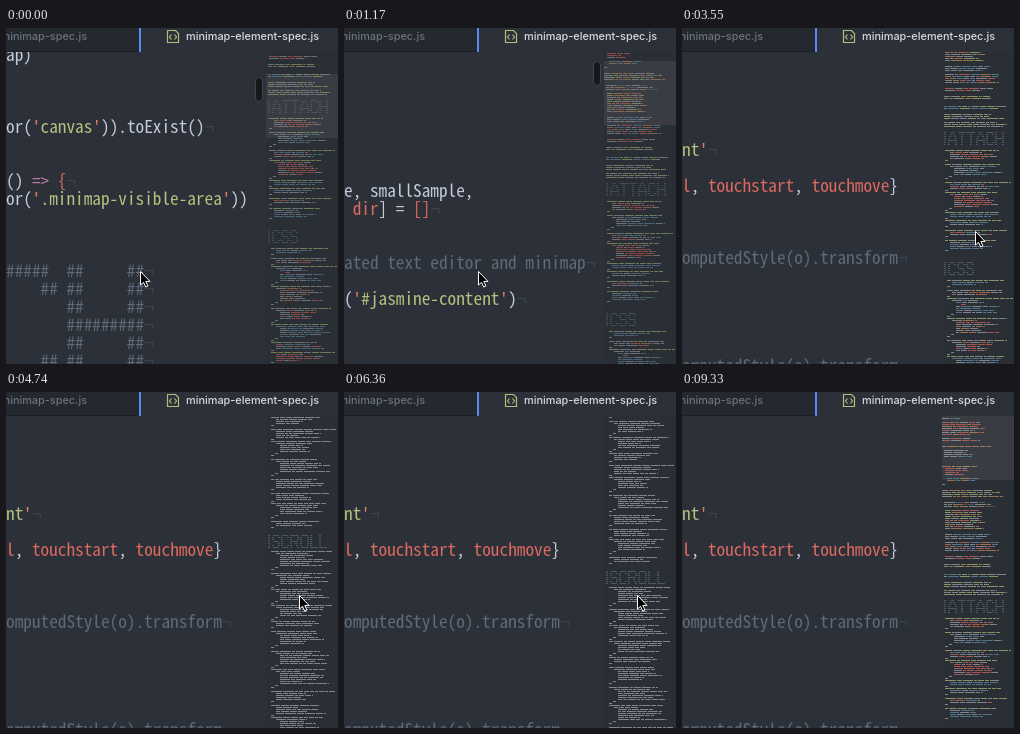
These frames come from a looping animation (332 by 336 pixels, 9880 ms). An HTML page with a canvas:

```html
<!DOCTYPE html>
<html lang="en">
<head>
<meta charset="utf-8">
<title>Minimap scrolling</title>
<style>
html, body { margin: 0; width: 332px; height: 336px; overflow: hidden; background: #2c3038; }
canvas { display: block; }
</style>
</head>
<body>
<canvas id="stage" width="332" height="336"></canvas>
<script>
const W = 332, H = 336, TOP = 24, MAP_X = 260, LINES = 570, LOOP = 9880;
const CHAR = 8.64, LINE = 18, CUT = 46; // first column visible in the editor
const ctx = document.getElementById('stage').getContext('2d');
const color = {
  w: '#c5ccd8', r: '#dd6a60', g: '#b4c47e', q: '#d97e62', p: '#b877a6',
  c: '#5f6b78', i: '#3d434c', o: '#c99264', b: '#6796b3', n: '#a8adb6'
};

// Tall narrow code face, sized so that one character is CHAR wide
const mono = '"Noto Sans Mono CJK JP", "Noto Sans Mono CJK SC", "Noto Sans Mono", monospace';
ctx.font = '100px ' + mono;
const codeFont = `${100 * CHAR / ctx.measureText('0').width}px ${mono}`;

// Banner lettering: every letter is seven rows picked from these strokes
const strokes = {
  a: '   ###   ', b: '  ## ##  ', c: ' ##   ## ', d: '##     ##', e: '#########',
  f: '########', g: '   ##   ', h: ' ###### ', i: '##    ##', j: '##      ',
  k: '      ##', l: '######## ', m: '##   ##  ', n: '##    ## ', o: ' ####### '
};
const letters = {
  A: 'abcdedd', T: 'fgggggg', C: 'hijjjih', H: 'dddeddd',
  S: 'hijhkih', R: 'lddlmnd', O: 'odddddo', L: 'jjjjjjf'
};
const banner = word => [...'0123456'].map(r =>
  '  //  ' + [...word].map(l => strokes[letters[l][r]]).join(' '));
const banners = { 91: banner('ATTACH'), 156: banner('CSS'), 308: banner('SCROLL') };

// Editor lines: number, then pairs of colour and text
const code = [
  [5, 'g', 'nt', 'q', "'", 'i', '¬'],
  [7, 'r', 'l', 'w', ', ', 'r', 'touchstart', 'w', ', ', 'r', 'touchmove', 'w', '}'],
  [11, 'c', 'omputedStyle(o).transform', 'i', '¬'],
  [17, 'c', 'omputedStyle(o).transform', 'i', '¬'],
  [38, 'w', 'e, smallSample,'],
  [39, 'r', ' dir', 'w', '] = ', 'r', '[]', 'i', '¬'],
  [42, 'c', 'ated text editor and minimap', 'i', '¬'],
  [44, 'w', '(', 'q', "'", 'g', '#jasmine-content', 'q', "'", 'w', ')', 'i', '¬'],
  [79, 'w', 'ap)'],
  [83, 'w', 'or(', 'q', "'", 'g', 'canvas', 'q', "'", 'w', ')).toExist()', 'i', '¬'],
  [86, 'w', '() ', 'p', '=>', 'r', ' {', 'i', '¬'],
  [87, 'w', 'or(', 'q', "'", 'g', '.minimap-visible-area', 'q', "'", 'w', '))'],
  ...banners[91].map((row, n) => [91 + n, 'c', row.slice(CUT), 'i', '¬'])
];

// Minimap rows: [column, width, colour key]
let seed = 11;
const rnd = () => (seed = seed * 16807 % 2147483647) / 2147483647;
const between = (a, b) => Math.floor(a + rnd() * (b - a + 1));
const rows = Array.from({ length: LINES }, () => []);

function words(line, col, width, hues) {
  if (line >= LINES) return;
  for (const end = col + width; col < end;) {
    const w = Math.min(between(3, 11), end - col);
    rows[line].push([col, w, hues[between(0, hues.length - 1)]]);
    col += w + 1;
  }
}

function blocks(from, to, col) {
  for (let line = from; line < to - 4;) {
    words(line++, col, between(44, 66), 'gggn');
    const count = Math.min(between(2, 7), to - line - 2);
    const hues = ['nrb', 'rrn', 'nro', 'bbn'][between(0, 3)];
    const nested = count > 4;
    for (let n = 0; n < count; n++) {
      words(line++, col + (nested && n ? 9 : 5), between(22, 50), hues);
    }
    if (nested) words(line++, col + 4, 3, 'n');
    words(line++, col, 3, 'n');
    line += between(0, 1);
  }
}

// First line, count, column, longest row, hues
[
  [0, 1, 0, 32, 'nb'], [2, 7, 0, 48, 'rron'], [10, 2, 0, 42, 'rn'], [14, 1, 0, 50, 'no'],
  [16, 4, 2, 36, 'nb'], [24, 1, 0, 52, 'og'], [25, 4, 3, 24, 'nr'], [30, 2, 5, 34, 'bo'],
  [33, 1, 0, 3, 'n'], [36, 4, 0, 62, 'nog'], [42, 3, 2, 55, 'nco'], [46, 10, 3, 40, 'ogrn'],
  [58, 3, 3, 50, 'nb'], [62, 5, 3, 60, 'rnob'], [69, 2, 3, 50, 'rn'], [73, 2, 2, 55, 'nog'],
  [78, 2, 2, 64, 'nbg'], [82, 3, 2, 68, 'nng'], [86, 3, 2, 70, 'ng']
].forEach(([line, count, col, max, hues]) => {
  for (let n = 0; n < count; n++) words(line + n, col, between(max * .6, max), hues);
});
blocks(100, 154, 3);
blocks(165, 306, 5);
blocks(316, LINES, 5);
rows[177] = [[19, 5, 'r']];

function paintMap(grey) {
  const strip = document.createElement('canvas');
  strip.width = W - MAP_X;
  strip.height = LINES * 2;
  const s = strip.getContext('2d');
  s.globalAlpha = .68;
  rows.forEach((row, line) => row.forEach(([col, w, hue]) => {
    s.fillStyle = color[grey && line !== 177 ? 'n' : hue];
    s.fillRect(col, line * 2, w, 1);
  }));
  s.fillStyle = color.c;
  for (const first in banners) banners[first].forEach((row, n) =>
    [...row].forEach((ch, col) => ch !== ' ' && s.fillRect(col, (+first + n) * 2, 1, 1)));
  return strip;
}
const colorMap = paintMap(false), greyMap = paintMap(true);

// Keys are [step, values...]; linear in between
function track(keys, k) {
  const next = keys.findIndex(key => key[0] > k);
  if (next < 0) return keys.at(-1).slice(1);
  if (!next) return keys[0].slice(1);
  const a = keys[next - 1], b = keys[next], u = (k - a[0]) / (b[0] - a[0]);
  return a.slice(1).map((v, n) => v + (b[n + 1] - v) * u);
}
const editorKeys = [[0, 1427], [8, 553], [10, 0]];
const mapKeys = [[22, 0], [23, 40], [24, 104], [29, 330], [32, 499], [37, 780],
  [38, 770], [45, 340], [48, 102], [49, 0]];
const cursorKeys = [[13, 134, 243], [17, 222, 171], [21, 293, 203], [52, 293, 203],
  [56, 154, 201], [60, 154, 201], [61, 205, 240], [62, 282, 310], [63, 290, 345]];

function rect(x, y, w, h, fill) {
  ctx.fillStyle = fill;
  ctx.fillRect(x, y, w, h);
}

function drawTabs() {
  rect(0, 0, 133, TOP, '#24282f');
  rect(0, TOP - 1, 133, 1, '#1b1e24');
  rect(133, 0, 2, TOP, '#568af2');
  ctx.font = '500 10.9px Inter, Roboto, sans-serif';
  ctx.textAlign = 'right';
  ctx.fillStyle = '#6c727d';
  ctx.fillText('minimap-spec.js', 81, 12);
  ctx.textAlign = 'left';
  ctx.fillStyle = '#d7dae0';
  ctx.fillText('minimap-element-spec.js', 180, 12);
  ctx.strokeStyle = '#b3bd77';
  ctx.lineWidth = 1.2;
  ctx.stroke(new Path2D('M161.5 2.5h8l3 3v9h-11zM165.5 6.5l-2 2.5 2 2.5M168.5 6.5l2 2.5-2 2.5'));
}

function drawCode(scroll) {
  ctx.font = codeFont;
  for (const [line, ...parts] of code) {
    const y = 38 + LINE * line - scroll;
    if (y < 10 || y > H + 20) continue;
    for (let n = 0, col = 0; n < parts.length; n += 2) {
      ctx.fillStyle = color[parts[n]];
      ctx.fillText(parts[n + 1], col * CHAR, y);
      col += parts[n + 1].length;
    }
  }
}

function drawMap(k, scroll) {
  const top = k > 10 ? track(mapKeys, k)[0] : scroll / 9 * .86;
  const grey = k > 24 && k < 49 && k !== 38;
  rect(MAP_X, TOP, W - MAP_X, H, '#2a2e35');
  rect(MAP_X, TOP + Math.round(scroll / 9 - top), W - MAP_X, 64, 'rgba(255,255,255,.07)');
  ctx.globalAlpha = k < 10 ? .75 : 1;
  ctx.drawImage(grey ? greyMap : colorMap, MAP_X, TOP + 2 - Math.round(top));
  ctx.globalAlpha = 1;
  if (k < 10) {
    ctx.beginPath();
    ctx.roundRect(249.5, Math.round(23 + scroll * .0182) + .5, 7, 24, 3.5);
    ctx.fillStyle = '#16181d';
    ctx.fill();
    ctx.strokeStyle = '#3f444d';
    ctx.lineWidth = 1;
    ctx.stroke();
  }
}

const arrow = new Path2D('M.5 .5V14l3-2.7L5.7 16l2.2-1-2.1-4.6H10z');
function drawCursor(k) {
  const [x, y] = track(cursorKeys, k);
  ctx.save();
  ctx.translate(Math.round(x), Math.round(y));
  ctx.fillStyle = '#000';
  ctx.fill(arrow);
  ctx.strokeStyle = '#fff';
  ctx.lineWidth = 1;
  ctx.stroke(arrow);
  ctx.restore();
}

function draw(now) {
  const k = Math.floor((now % LOOP + 20) / 148.2);
  const scroll = track(editorKeys, k)[0];
  rect(0, 0, W, H, '#2c3038');
  ctx.save();
  ctx.beginPath();
  ctx.rect(0, TOP, W, H - TOP);
  ctx.clip();
  drawCode(scroll);
  drawMap(k, scroll);
  ctx.restore();
  drawTabs();
  drawCursor(k);
  requestAnimationFrame(draw);
}
requestAnimationFrame(draw);
</script>
</body>
</html>
```
